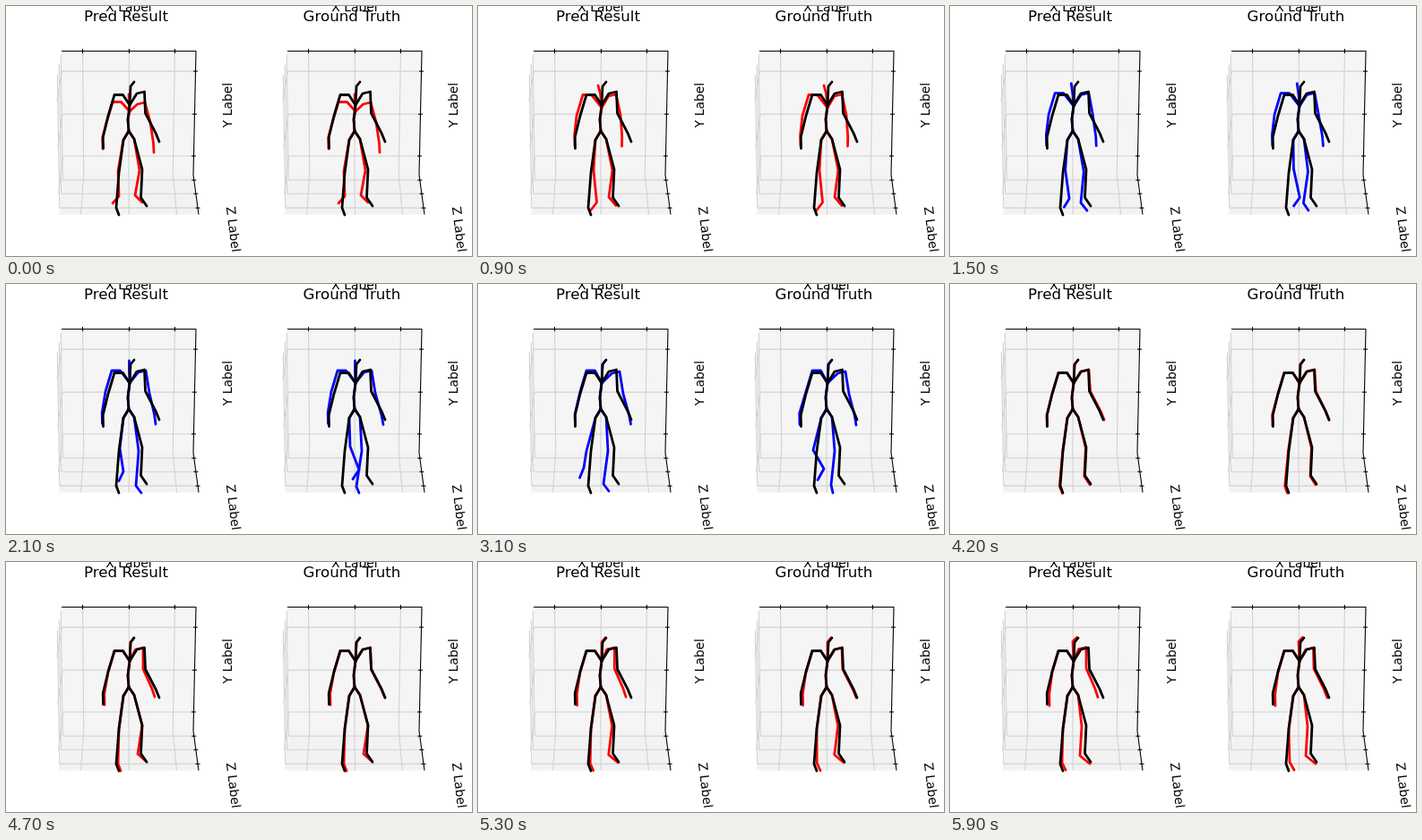
These frames come from a looping animation (520x280 px, 6 s). An HTML page with a canvas:

```html
<!DOCTYPE html>
<html>
<head>
<meta charset="utf-8">
<style>
html, body { margin: 0; width: 100%; height: 100%; overflow: hidden; background: #fff; }
canvas { display: block; }
</style>
</head>
<body>
<canvas id="stage" width="520" height="280"></canvas>
<script>
const ctx = document.getElementById('stage').getContext('2d');
const PANEL_GAP = 252, STEP_MS = 100, STEPS = 60;

// Joints that never move
const fixed = { root: [137, 140], hipL: [131, 150], hipR: [143, 149], spine: [136, 127] };

// Black rest pose
const rest = {
  chest: [138, 111], neck: [139, 90], head: [143, 85],
  shoulderL: [121, 99.5], handL: [108.5, 159.5],
  shoulderR: [154.5, 96], elbowR: [155.5, 120], handR: [171, 152],
  kneeL: [126, 187], ankleL: [123, 226], toeL: [126, 234],
  kneeR: [152, 183], ankleR: [150.5, 214.5], toeR: [157, 224]
};

// Key times, in steps; the coloured figure meets the rest pose at REST_KEY
const keyTimes = [0, 9, 21, 31, 37, 43, 47, 59];
const REST_KEY = 5;

const upper = {
  chest: [[138, 118], [138, 114], [138, 111], [138, 111], [138, 111], [138, 111], [138, 111]],
  neck: [[137.5, 108], [136.5, 98], [137.5, 98], [139, 90], [139, 90], [139, 90], [137, 89]],
  head: [[137, 99], [134, 89], [137.5, 86], [142, 86], [142.5, 85], [142.5, 85], [141.5, 84.5]],
  shoulderL: [[119, 107.5], [117, 99.5], [118, 97], [121, 97], [121, 98], [121, 99.5], [121, 99.5]],
  handL: [[108, 160], [108, 157], [107.5, 156.5], [108.5, 158], [108, 158], [110, 160], [111, 161]],
  shoulderR: [[155, 108], [154, 99], [156, 97], [158, 98], [157, 97], [153, 96], [152, 95.5]],
  elbowR: [[161, 130], [159, 122], [160, 122], [162, 123], [162, 122], [153, 120], [152, 119]],
  handR: [[165, 164], [160.5, 157], [167, 157], [170.5, 157], [176, 153], [166, 151], [165, 151.5]]
};

const legs = {
  kneeL: [[125, 185], [129, 184], [127, 184], [121, 187], [124, 187], [126, 187], [126, 187]],
  ankleL: [[126, 213], [132.5, 220], [131, 210], [118, 206], [119, 226], [125, 226], [125, 225]],
  toeL: [[119, 221], [126, 228.5], [126, 220.5], [113.5, 217], [121, 234], [128, 234], [129, 233]],
  kneeR: [[149, 184], [150, 184], [148, 187], [145, 187], [147, 187], [152, 183], [147, 184]],
  ankleR: [[144, 212], [146, 214], [145, 226], [140, 224], [143.5, 221], [147, 215], [145, 217]],
  toeR: [[152, 220], [154, 223.5], [151, 234], [146, 232], [149, 229], [156, 223], [156, 226]]
};

// Key poses that differ in the right-hand panel
const truthChanges = {
  handL: { 3: [107, 157.5], 4: [105.5, 156.5] },
  handR: { 2: [169, 157.5], 3: [170, 158], 4: [171, 156], 5: [171, 152], 6: [169, 152] },
  shoulderR: { 5: [154.5, 96], 6: [153.5, 96] },
  elbowR: { 5: [155.5, 120], 6: [154, 119.5] },
  kneeL: { 2: [132, 182], 3: [122, 186], 4: [122, 187] },
  ankleL: { 2: [142, 208], 3: [134, 207], 4: [116, 226], 6: [127, 224] },
  toeL: { 2: [135, 218.5], 3: [127, 219.5], 4: [116, 234], 6: [132, 233] },
  kneeR: { 2: [145, 187], 3: [146, 187] },
  ankleR: { 2: [139, 227], 3: [142, 225], 4: [145, 221] },
  toeR: { 2: [142, 234], 3: [144, 234], 4: [148, 229.5] }
};

function buildTracks(changes) {
  const tracks = {};
  for (const [name, keys] of Object.entries({ ...upper, ...legs })) {
    const track = Object.assign([...keys], changes[name]);
    track.splice(REST_KEY, 0, rest[name]);
    tracks[name] = track;
  }
  return tracks;
}

const panels = [
  { title: 'Pred Result', x: 0, tracks: buildTracks({}) },
  { title: 'Ground Truth', x: PANEL_GAP, tracks: buildTracks(truthChanges) }
];

// Cubic Hermite through the keys, with finite-difference slopes
function sample(track, time) {
  const last = keyTimes.length - 1;
  let i = 0;
  while (i < last - 1 && time >= keyTimes[i + 1]) i++;
  const span = keyTimes[i + 1] - keyTimes[i], u = (time - keyTimes[i]) / span;
  return [0, 1].map(axis => {
    const slope = k => {
      const a = Math.max(k - 1, 0), b = Math.min(k + 1, last);
      return (track[b][axis] - track[a][axis]) / (keyTimes[b] - keyTimes[a]) * span;
    };
    const p = track[i][axis], q = track[i + 1][axis], w = 1 - u;
    return p * w * w * (1 + 2 * u) + q * u * u * (3 - 2 * u)
      + slope(i) * u * w * w - slope(i + 1) * u * u * w;
  });
}

const shift = (p, dx, dy) => [p[0] + dx, p[1] + dy];
const mix = (p, q, u) => [p[0] + (q[0] - p[0]) * u, p[1] + (q[1] - p[1]) * u];

function path(points) {
  ctx.beginPath();
  points.forEach(p => ctx.lineTo(...p));
}

function line(color, width, ...points) {
  ctx.strokeStyle = color;
  ctx.lineWidth = width;
  path(points);
  ctx.stroke();
}

function fill(color, ...points) {
  ctx.fillStyle = color;
  path(points);
  ctx.fill();
}

function label(text, x, y, size, degrees = 0) {
  ctx.save();
  ctx.translate(x, y);
  ctx.rotate(degrees * Math.PI / 180);
  ctx.font = `${size}px "DejaVu Sans", sans-serif`;
  ctx.textAlign = 'center';
  ctx.fillStyle = '#000';
  ctx.fillText(text, 0, size * 0.365);
  ctx.restore();
}

function drawSkeleton(joints, color) {
  const j = { ...fixed, ...joints };
  const bone = (...points) => line(color, 2.8, ...points);
  bone(j.root, j.hipL, j.kneeL, j.ankleL, j.toeL);
  bone(j.root, j.hipR, j.kneeR, j.ankleR, j.toeR);
  bone(j.root, j.spine, j.chest, j.neck, j.head);
  bone(j.chest, shift(j.shoulderL, 9.5, 0), j.shoulderL,
    shift(j.shoulderL, -7, 23.5), shift(j.handL, -0.3, -12.5), j.handL);
  bone(j.chest, shift(j.shoulderR, -8.5, 2), j.shoulderR,
    j.elbowR, shift(mix(j.elbowR, j.handR, 0.7), 0.7, 0), j.handR);
}

// Corners of the room: back wall, and the front edges of wall and floor
const backTL = [62, 50.5], backTR = [212, 50.5], backBL = [64, 189], backBR = [209, 189];
const frontTL = [56.5, 82], frontBL = [59, 233.5], frontBR = [215, 233.5];

function drawAxes(title) {
  fill('#f9f9f9', backTL, backBL, frontBL, frontTL);
  fill('#f5f5f5', backTL, backTR, backBR, backBL);
  fill('#f2f2f2', backBL, backBR, frontBR, frontBL);

  const grid = (...points) => line('#d2d2d2', 1.1, ...points);
  const tick = (p, dx, dy) => line('#000', 1.1, shift(p, -dx, -dy), shift(p, dx, dy));
  for (const u of [0.157, 0.503, 0.843]) {
    const top = mix(backTL, backTR, u);
    grid(top, mix(backBL, backBR, u), mix(frontBL, frontBR, u));
    tick(top, 0, 2.5);
  }
  for (const u of [0.163, 0.51, 0.848]) {
    const right = mix(backTR, backBR, u);
    grid(mix(frontTL, frontBL, u), mix(backTL, backBL, u), right);
    tick(right, 2.5, 0);
  }
  for (const u of [0.136, 0.477, 0.835]) {
    const right = mix(backBR, frontBR, u);
    grid(mix(backTL, frontTL, u), mix(backBL, frontBL, u), right);
    tick(right, 2.5, 0);
  }
  line('#000', 1.1, backTL, backTR, backBR, frontBR);

  label(title, 134, 10.5, 16.67);
  label('X Label', 137, 0.5, 13.89);
  label('Y Label', 247, 111, 13.89, -90);
  label('Z Label', 254, 250, 13.89, 83);
}

function draw(now) {
  const step = Math.floor(now / STEP_MS) % STEPS;
  const color = step >= 10 && step < 40 ? '#00f' : '#f00';
  ctx.fillStyle = '#fff';
  ctx.fillRect(0, 0, 520, 280);
  ctx.lineJoin = 'round';
  for (const { title, x, tracks } of panels) {
    ctx.save();
    ctx.translate(x, 0);
    ctx.lineCap = 'butt';
    drawAxes(title);
    ctx.lineCap = 'round';
    const pose = {};
    for (const name in tracks) pose[name] = sample(tracks[name], step);
    drawSkeleton(pose, color);
    drawSkeleton(rest, '#000');
    ctx.restore();
  }
}

const start = performance.now();
function loop() {
  draw(performance.now() - start);
  requestAnimationFrame(loop);
}
loop();
</script>
</body>
</html>
```
